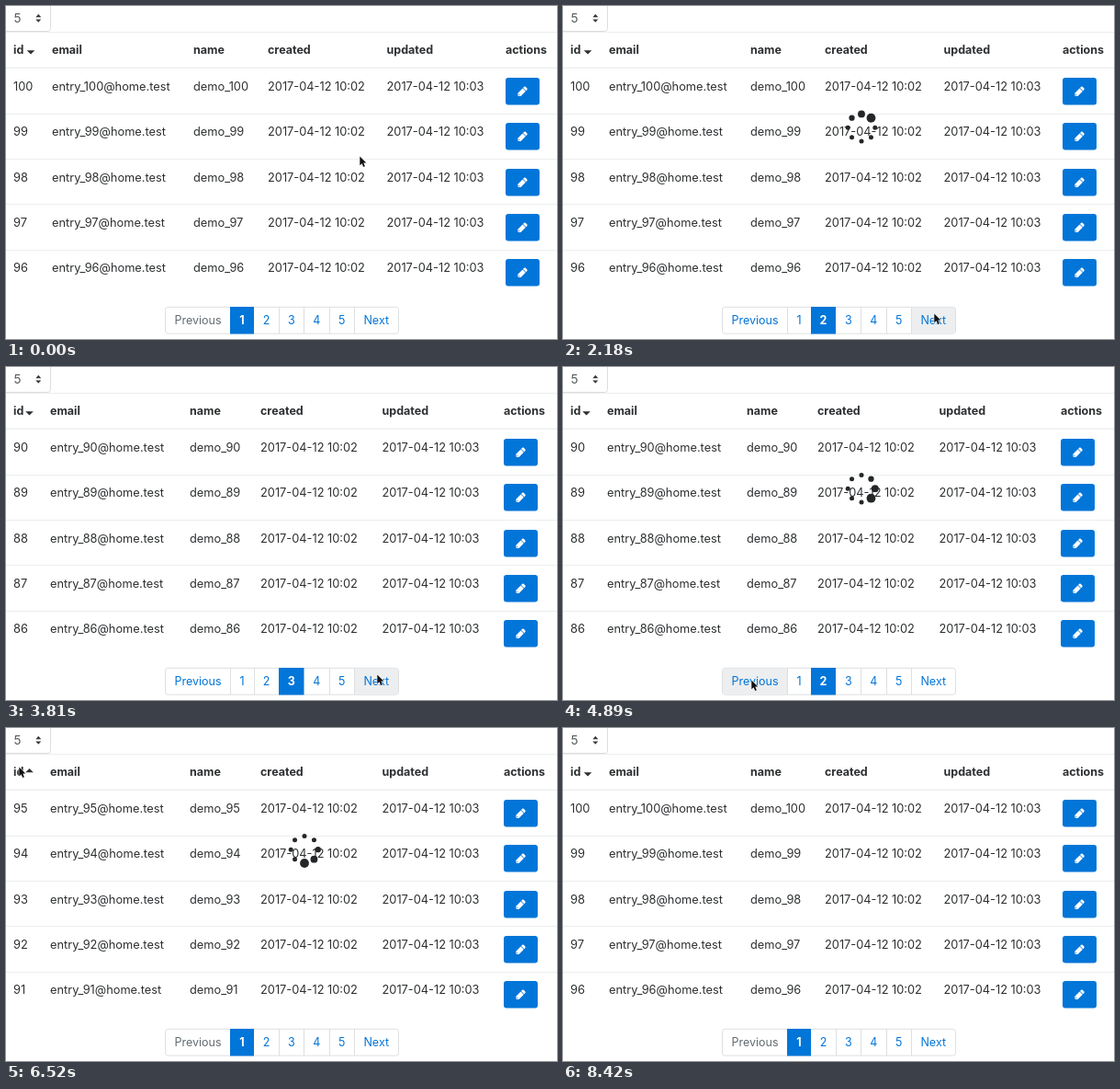
Recreate the animation shown at these times as an HTML page. Size 600 by 362 pixels, loop 9.53 s.

```html
<!DOCTYPE html>
<html lang="en">
<head>
<meta charset="utf-8">
<title>Paged table</title>
<style>
  html, body { margin: 0; width: 100%; height: 100%; overflow: hidden; background: #fff; }
  svg { display: block; width: 600px; height: 362px; }
  text { font: 12.5px Inter, "Open Sans", sans-serif; fill: #2d2f31; white-space: pre; }
  .cell { font-size: 12.8px; }
  .bold { font-weight: 700; }
  .mid { text-anchor: middle; }
  .size { font-size: 13.5px; }
</style>
</head>
<body>
<svg id="stage" viewBox="0 0 600 362"></svg>
<script>
const LOOP = 9530, BLUE = '#0275d8', LINE = '#eceeef', EDGE = '#dddfe1', INK = '#2d2f31', ROW = 49.35;
const stage = document.getElementById('stage');

// Column positions and sort caret centre depend on the widest cell.
const layouts = {
  wide:   { cols: [8, 50, 204, 285, 414.5, 544], caret: 27 },
  medium: { cols: [8, 48, 200, 277, 409.5, 542], caret: 25.5 },
  narrow: { cols: [8, 50, 197, 268, 403, 540], caret: 27 }
};
const heads = ['id', 'email', 'name', 'created', 'updated', 'actions'];

// Each step changes part of the state and holds until the next one.
// at: cursor tip, spin: leading dot of the spinner, hot: focused pager link
const steps = [
  [0,    { first: 100, page: 1, asc: false, spin: null, hot: '', at: [385, 163] }],
  [270,  { at: [392, 183] }],
  [540,  { at: [414, 247] }],
  [810,  { at: [426, 310] }],
  [1080, { at: [412, 334] }],
  [1350, { at: [404, 334] }],
  [2180, { page: 2, hot: 'Next', spin: 1 }],
  [2450, { spin: 3 }],
  [2720, { first: 95, spin: null }],
  [3270, { page: 3, spin: 1 }],
  [3540, { spin: 3 }],
  [3810, { first: 90, spin: null }],
  [4080, { at: [318, 338] }],
  [4350, { at: [212, 341] }],
  [4620, { at: [205, 340], page: 2, hot: 'Previous', spin: 1 }],
  [4890, { spin: 3 }],
  [5160, { first: 95, spin: null, at: [172, 244] }],
  [5430, { at: [52, 88] }],
  [5700, { at: [14, 42] }],
  [6250, { page: 1, hot: '', asc: true, spin: 2 }],
  [6520, { spin: 4 }],
  [6790, { first: 1, spin: null }],
  [7340, { asc: false, spin: 1 }],
  [7610, { spin: 3 }],
  [7880, { first: 100, spin: null }],
  [8150, { at: [24, 5] }],
  [8420, { at: null }]
];

const text = (x, y, s, cls, fill = INK) =>
  `<text x="${x}" y="${y}" class="${cls}" style="fill:${fill}">${s}</text>`;
const rect = (x, y, w, h, fill, more = '') =>
  `<rect x="${x}" y="${y}" width="${w}" height="${h}" fill="${fill}" ${more}/>`;
const path = (d, fill, more = '') => `<path d="${d}" fill="${fill}" ${more}/>`;

function picker() {
  return path('M0 27.5H45.5Q48.5 27.5 48.5 24.5V0', 'none', 'stroke="#dcdcdc"')
    + text(8.5, 18, 5, 'size', '#55595c')
    + path('M32.3 12.2L35.3 8.8L38.3 12.2ZM32.3 14.4H38.3L35.3 17.8Z', '#373a3c');
}

function header({ cols, caret }, asc) {
  const tri = `M${caret - 4.3} 48.3h8.6l-4.3 ${asc ? -4.3 : 4.3}z`;
  return rect(0, 28, 600, 1, LINE) + rect(0, 66.5, 600, 1.5, LINE)
    + heads.map((h, i) => text(cols[i], 52.4, h, 'bold')).join('')
    + path(tri, INK);
}

function button(x, y) {
  return rect(x, y, 37, 29.4, BLUE, 'rx="3"')
    + `<g transform="translate(${x + 18.2} ${y + 15})rotate(-45)">`
    + path('M-6.6 0L-4.6 -2.3H2.8V2.3H-4.6ZM3.5 -2.3H5Q6.2 -2.3 6.2 -1.1V1.1Q6.2 2.3 5 2.3H3.5Z', '#fff')
    + path('M-5.4 0L-4.4 -1V1Z', BLUE) + '</g>';
}

function row(id, i, cols) {
  const y = 91.8 + i * ROW;
  const cells = [id, `entry_${id}@home.test`, `demo_${id}`, '2017-04-12 10:02', '2017-04-12 10:03'];
  return (i ? rect(0, Math.round(67.3 + i * ROW), 600, 1, LINE) : '')
    + cells.map((c, k) => text(cols[k], y, c, 'cell')).join('')
    + button(cols[5], Math.round(77.9 + i * ROW));
}

function pager({ page, hot }) {
  const names = ['Previous', 1, 2, 3, 4, 5, 'Next'];
  const edges = [174, 244, 270, 297, 324.5, 352, 379.5, 427];
  let out = rect(173.5, 327.3, 254, 28.9, 'none', `rx="3" stroke="${EDGE}"`);
  names.forEach((name, i) => {
    const x = edges[i], w = edges[i + 1] - x, on = name === page;
    const off = i === 0 && page === 1;
    if (on) out += rect(x, 327, w, 29.5, BLUE);
    else if (name === hot) out += rect(x, 327.8, w, 28, LINE);
    if (i && !on && names[i - 1] !== page) out += rect(Math.floor(x), 327, 1, 29, EDGE);
    out += text(x + w / 2, 346.4, name, on ? 'mid bold' : 'mid', on ? '#fff' : off ? '#636c72' : BLUE);
  });
  return out;
}

function spinner(head) {
  let out = '';
  for (let i = 0; i < 8; i++) {
    const a = i * Math.PI / 4, lag = (head - i + 8) % 8;
    const r = Math.max(2.5, 4.9 * .8 ** lag);
    out += `<circle cx="${325 + 14.8 * Math.sin(a)}" cy="${132.2 - 14.8 * Math.cos(a)}" r="${r}" fill="#242628"/>`;
  }
  return out;
}

function cursor([x, y]) {
  return path('M0 0V9.8L2.3 7.8L3.9 11.5L5.6 10.8L4 7.2H7Z', '#111',
    `stroke="#fff" paint-order="stroke" transform="translate(${x + .3} ${y + .4})"`);
}

function draw(s) {
  const layout = layouts[s.first === 100 ? 'wide' : s.first === 1 ? 'narrow' : 'medium'];
  const dir = s.first === 1 ? 1 : -1;
  let out = picker() + header(layout, s.asc);
  for (let i = 0; i < 5; i++) out += row(s.first + dir * i, i, layout.cols);
  out += pager(s);
  if (s.spin !== null) out += spinner(s.spin);
  if (s.at) out += cursor(s.at);
  stage.innerHTML = out;
}

const begin = performance.now();
let shown = 0;
function tick() {
  const t = (performance.now() - begin) % LOOP;
  const past = steps.filter(([start]) => start <= t);
  if (past.length !== shown) {
    shown = past.length;
    draw(Object.assign({}, ...past.map(([, change]) => change)));
  }
  requestAnimationFrame(tick);
}
tick();
</script>
</body>
</html>
```
